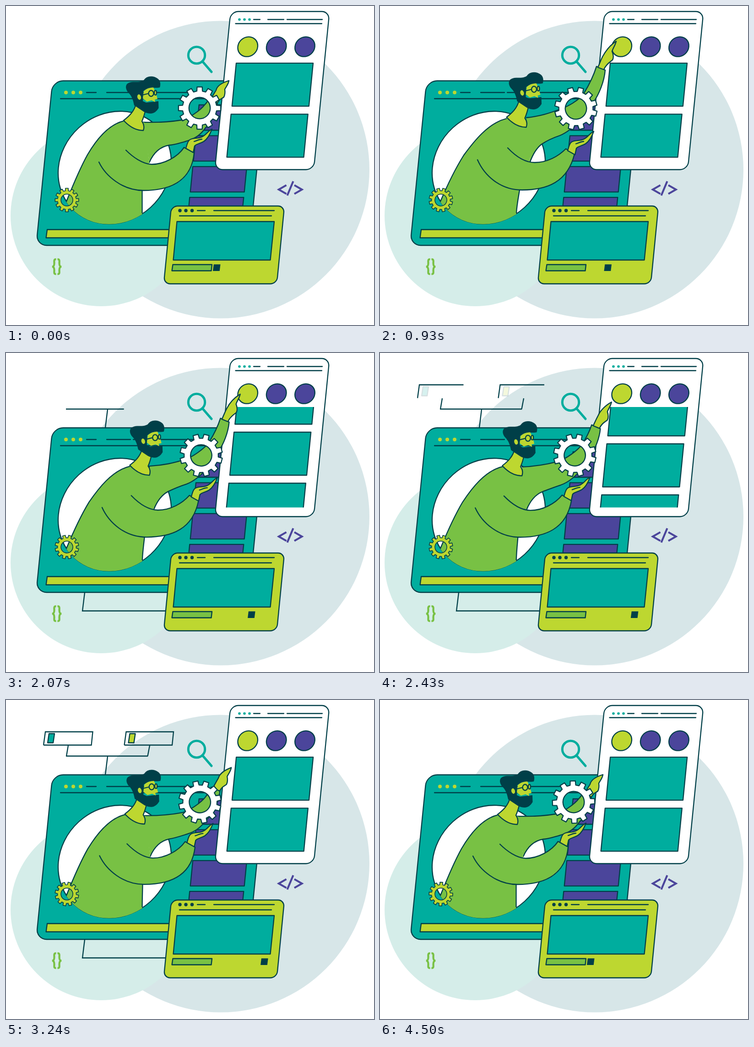
Animation, 804 px wide and 697 px high, one loop 4.53 s. Source, as an HTML page:

```html
<!DOCTYPE html>
<html lang="en">
<head>
<meta charset="utf-8">
<title>Building a page</title>
<style>
html, body { margin: 0; width: 100%; height: 100%; overflow: hidden; background: #fff; }
svg { display: block; width: 804px; height: 697px; }
.o { stroke: #003f48; stroke-width: 2.3; stroke-linejoin: round; stroke-linecap: round; }
.n { fill: none; }
.w { fill: #fff; } .d { fill: #003f48; } .t { fill: #00ad9e; }
.l { fill: #bdd730; } .g { fill: #78c144; } .p { fill: #4b459b; }
.draw { stroke-linecap: butt; stroke-linejoin: miter; }
</style>
</head>
<body>
<svg viewBox="0 0 804 697">
  <defs>
    <clipPath id="view"><path d="M490 118H690L660 337.5H465Z"/></clipPath>
    <clipPath id="porthole">
      <rect x="100" y="200" width="400" height="153"/>
      <circle r="123.8" transform="translate(237.5 353) skewX(-5.6)"/>
    </clipPath>
  </defs>

  <circle cx="469" cy="357.5" r="325" fill="#d7e6e8"/>
  <circle cx="208" cy="458" r="198" fill="#d5ede9"/>

  <g id="tree">
    <path class="o n draw" data-in="1300 1640" d="M172 523L167 563.5H352"/>
    <path class="o n draw" data-in="1720 1890" d="M217 163L222 123"/>
    <path class="o n draw" data-in="1880 2150" d="M131 122.5H310"/>
    <path class="o n draw" data-in="2170 2320" d="M132 122.5L136 99"/>
    <path class="o n draw" data-in="2170 2320" d="M309.500 122.5L314 99"/>
    <g id="nodes"></g>
  </g>

  <!-- video window -->
  <rect class="o t" width="465.5" height="359.5" rx="23" transform="translate(101.8 163.5) skewX(-5.7)"/>
  <g class="l"><circle cx="131" cy="189" r="4"/><circle cx="147" cy="189" r="4"/><circle cx="163" cy="189" r="4"/></g>
  <path class="o n" d="M176 189H197M220 189H272M278 189H440M119 202.500H440"/>
  <circle class="o w" r="123" transform="translate(237.5 353) skewX(-5.6)"/>
  <path class="o l" d="M90 488.500H375L373 506.500H87.500Z"/>
  <g id="list"></g>

  <!-- page -->
  <rect class="o w" width="216" height="345.5" rx="17" transform="translate(490.8 12) skewX(-5.7)"/>
  <g class="t"><circle cx="510" cy="29.500" r="2.8"/><circle cx="521" cy="29.500" r="2.8"/><circle cx="532" cy="29.500" r="2.8"/></g>
  <path class="o n" d="M541 29.500H555M572 29.500H607M614 29.500H691M501.500 38.500H690"/>
  <g class="o">
    <circle class="l" r="21.7" transform="translate(528.2 89) skewX(-5.6)"/>
    <circle class="p" r="21.7" transform="translate(590.7 89) skewX(-5.6)"/>
    <circle class="p" r="21.7" transform="translate(653 89) skewX(-5.6)"/>
  </g>
  <g clip-path="url(#view)"><g id="cards"></g></g>

  <!-- man -->
  <path id="farArm" class="o g"/>
  <path id="farHand" class="o l"/>
  <g clip-path="url(#porthole)">
    <path id="torso" class="g"/>
    <path id="torsoLine" class="o n"/>
  </g>
  <path id="nearArm" class="o g"/>
  <path id="neck" class="o l" d="M284 214C280 230 270 240 257 250C268 262 282 272 300 272C303 263 300 256 297 252C300 245 302 240 305 226Z"/>
  <g id="head">
    <path class="d" d="M268 190C260 182 260 171 268 168C278 163 290 169 301 162C307 152 322 151 332 159C338 164 338 172 336 178C326 180 316 177 308 181L300 186L299 208L306 211L333 208L333.500 223Q327 234 317 235Q308 235 301 231L280 217C278 208 276 198 268 190Z"/>
    <path class="l" d="M301 186C305 182 312 178 322 178C325 184 328 191 331 203L325 204.500L326 210L318 206L308 209L299 202Z"/>
    <ellipse class="l" cx="291" cy="199" rx="4" ry="6" transform="rotate(-15 291 199)"/>
    <path class="o n" d="M300 194L310 191.500"/>
    <ellipse class="o l" cx="317" cy="191" rx="5.500" ry="6.500"/>
    <ellipse class="o l" cx="326.500" cy="189.500" rx="2.500" ry="5"/>
  </g>
  <path id="bigGear" class="o w" fill-rule="evenodd"/>
  <g id="nearHand">
    <path class="o l" d="M393 311C396 300 398 293 404 291C412 288 420 290 428 286C437 282 440 274 450 269C446 280 441 290 432 296C424 301 416 301 412 306L409 320Z"/>
    <path class="o n" d="M411 296C418 294 422 291 428 291"/>
  </g>
  <path id="smallGear" class="o l" style="stroke-width:1.6" fill-rule="evenodd"/>

  <!-- player -->
  <rect class="o l" width="247" height="170" rx="14" transform="translate(361.3 437) skewX(-5.6)"/>
  <g class="d"><circle cx="380" cy="447" r="3.700"/><circle cx="393" cy="447" r="3.700"/><circle cx="406.500" cy="447" r="3.700"/></g>
  <path class="o n" d="M418 447H435M454 447H586M379 458.500H580"/>
  <path class="o t" d="M373.500 471H586L577.500 555H365.500Z"/>
  <path class="o g" d="M364.500 565H450L448.500 578.500H362.500Z"/>
  <path id="knob" class="d" d="M1.800 564.500H16.500L14.700 579H0Z"/>

  <!-- loose icons -->
  <g fill="none" stroke="#00ad9e" stroke-width="5" stroke-linecap="round">
    <circle cx="416.500" cy="107.500" r="18.200"/><path d="M430 122L449 144"/>
  </g>
  <path fill="none" stroke="#4b459b" stroke-width="4.200" d="M612.500 391.500L596 401L612.500 410.500M627.500 383L614.500 414M630 391.500L646.500 401L630 410.500"/>
  <g fill="none" stroke="#78c144" stroke-width="4.200">
    <path id="brace" d="M109.500 553.500C104 553 105.500 558 105.500 562C105.500 567 104.500 569 101 569.500C104.500 570 105.500 573 105.500 577C105.500 582 104 586 109.500 585.500"/>
    <use href="#brace" transform="matrix(-1 0 0 1 222 0)"/>
  </g>
</svg>
<script>
const LOOP = 4530;
const $ = id => document.getElementById(id);
const clamp = (v, a = 0, b = 1) => Math.min(b, Math.max(a, v));

// Blends two path strings with the same commands.
function mix(a, b, k) {
  const to = b.match(/-?[\d.]+/g);
  let i = 0;
  return a.replace(/-?[\d.]+/g, n => (+n + (to[i++] - n) * k).toFixed(2));
}

// Smooth curve through [time, value] keys without overshoot.
function track(keys) {
  const slope = keys.slice(1).map((k, i) => (k[1] - keys[i][1]) / (k[0] - keys[i][0]));
  const tan = keys.map((_, i) => {
    const a = slope[i - 1] || 0, b = slope[i] || 0;
    return a * b > 0 ? 2 * a * b / (a + b) : 0;
  });
  return t => {
    let i = 0;
    while (i < keys.length - 2 && t > keys[i + 1][0]) i++;
    const h = keys[i + 1][0] - keys[i][0], u = clamp((t - keys[i][0]) / h), v = 1 - u;
    return keys[i][1] * (1 + 2 * u) * v * v + keys[i + 1][1] * u * u * (3 - 2 * u)
      + h * u * v * (tan[i] * v - tan[i + 1] * u);
  };
}

function gear(outer, root, hole) {
  let d = "";
  for (let i = 0; i < 12; i++) {
    const a = i * Math.PI / 6;
    for (const [r, off] of [[root, -.165], [outer, -.12], [outer, .12], [root, .165]])
      d += (d ? "L" : "M") + (r * Math.sin(a + off)).toFixed(2) + " " + (-r * Math.cos(a + off)).toFixed(2);
  }
  return d + `ZM${hole} 0A${hole} ${hole} 0 1 0 ${-hole} 0A${hole} ${hole} 0 1 0 ${hole} 0Z`;
}

const slant = (x, y, w, h, cls) =>
  `<path class="o ${cls}" d="M${x} ${y}h${w}l${-h * .098} ${h}h${-w}Z"/>`;

$("bigGear").setAttribute("d", gear(46.5, 37.5, 23.3));
$("smallGear").setAttribute("d", gear(26, 20.5, 13));
$("list").innerHTML = [0, 1, 2, 3].map(i => slant(421.7 - 6.8 * i, 216 + 67.4 * i, 118, 55.5, "p")).join("");
$("cards").innerHTML = [-1, 0, 1].map(i => slant(503 - 11.3 * i, 124.8 + 111.5 * i, 168, 94, "t")).join("");
$("nodes").innerHTML = [[0, "t"], [176.5, "l"]].map(([x, c]) =>
  `<g transform="translate(${x})">
  <path class="o n draw" data-in="2280 2600" d="M82 98.500L86 69.500H189.500L186.500 98.500Z"/>
  <path class="o fade ${c}" d="M94 73.500H106L103 93.500H91Z"/></g>`).join("");

const lines = [...document.querySelectorAll(".draw")].map(el => {
  el.setAttribute("pathLength", 1);
  el.style.strokeDasharray = "1 2";
  return [el, ...el.dataset.in.split(" ").map(Number)];
});
const fades = [...document.querySelectorAll(".fade")];

const lean = track([[0, 0], [500, .5], [930, 1], [1080, 1.02], [1680, .85], [2070, .69], [2820, .33], [3240, .14], [3680, 0], [LOOP, 0]]);
const nod = track([[0, 0], [500, .52], [930, 1], [1020, 1.01], [1680, .63], [2070, .45], [2820, .2], [3600, 0], [LOOP, 0]]);
const reach = track([[0, 0], [300, .13], [540, .42], [930, 1], [1250, 1.13], [1680, 1], [2070, .85], [2820, .41], [3240, .18], [3700, 0], [LOOP, 0]]);
const slide = track([[0, 452], [930, 489.5], [1300, 493], [1680, 509.5], [2070, 528], [2790, 559.5], [3200, 559.5]]);

// Each part: resting pose, leaning pose.
const pose = {
  left: ["M258 251C222 259 195 296 178 325C163 352 150 382 132 427", "M276 246C236 256 205 296 183 326C166 353 151 382 132 427"],
  side: ["L297.500 452C297.500 435 297.500 420 297.500 402", "L298 452C299 435 302 420 305 402"],
  chest: ["L313 342L302 254Z", "L327 343L323 250Z"],
  near: ["M203 341C218 372 255 403 300 403C355 403 405 385 411 321L389 309C375 330 345 346 318 346C298 345 277 330 262 315",
         "M213 336C228 370 262 402 310 402C365 402 410 385 425 323L406 312C390 328 366 342 338 342C316 342 296 328 279 310"],
  armTop: ["M300 254C335 255 360 253 385 249C398 246", "M320 244C350 241 370 234 392 226C408 221"],
  armEnd: ["425 228 434 216C438 212 441 208 443 203L462 212C460 225 456 237 450 246C446 256 441 262 436 266",
           "436 206 446 190C457 172 467 151 473 132L492 140C490 165 479 192 466 211C458 225 450 240 440 250"],
  armLow: ["C425 282 412 290 398 294C382 299 370 303 357 304C338 307 323 319 313 342", "C425 262 410 276 393 283C378 288 365 294 353 302C340 312 333 326 327 343"],
  hand: ["M447 205C451 196 453 194 459 184C461 174 474 167 487 163C486 171 481 176 478 182C479 189 478 195 476 199C470 204 467 202 462 212Z",
         "M476 134C480 126 481 121 486 111C492 100 502 86 516 77C514 86 509 92 507 99C510 106 511 112 508 118C503 122 494 127 489 139Z"]
};
const at = (name, k) => mix(...pose[name], k);
const set = (id, d) => $(id).setAttribute("d", d);
const place = (id, x, y, r = 0) => $(id).setAttribute("transform", `translate(${x} ${y}) rotate(${r})`);

function render(t) {
  const body = lean(t), hand = reach(t), head = nod(t), spin = 360 * t / LOOP;

  const left = at("left", body), side = at("side", body);
  set("torso", left + "L132 480H298" + side + at("chest", body));
  set("torsoLine", left + side.replace("L", "M"));
  set("nearArm", at("near", body));
  set("farArm", at("armTop", body) + " " + at("armEnd", hand) + at("armLow", body));
  set("farHand", at("hand", hand));
  place("neck", 19.5 * body, -7 * body);
  place("head", 19.5 * head, -9 * body);
  place("nearHand", 17 * body, 5 * body);
  place("bigGear", 423 + 5 * body, 223 + body, spin);
  place("smallGear", 133, 424, -spin);

  const scroll = clamp((t - 1390) * .0708, 0, 111.5);
  place("cards", -.1 * scroll, scroll);
  place("knob", t < 3200 ? slide(t) : Math.max(452, 559.5 - (t - 3200) * .0827), 0);

  const out = clamp((4490 - t) / 620);
  for (const [el, from, to] of lines) {
    const p = Math.min(clamp((t - from) / (to - from)), out);
    el.style.strokeDashoffset = 1 - p;
    el.style.visibility = p > 0 ? "visible" : "hidden";
  }
  const shown = Math.min(clamp((t - 2400) / 200), out);
  for (const el of fades) el.style.opacity = shown;
}

function tick() {
  render(performance.now() % LOOP);
  requestAnimationFrame(tick);
}
tick();
</script>
</body>
</html>
```
